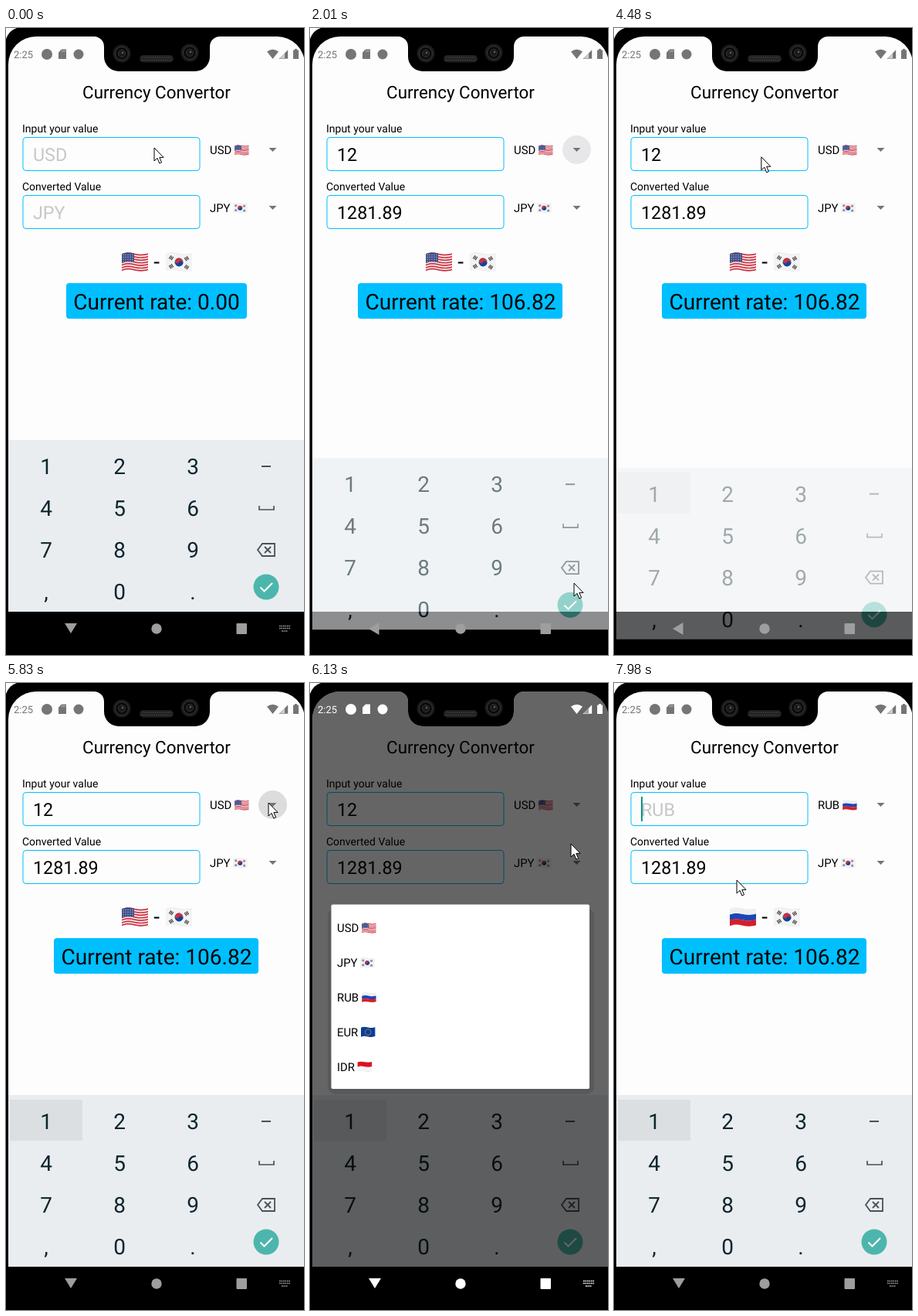
Animation of 386x811 px, one loop 8000 ms. Source, as an HTML page:

```html
<!DOCTYPE html>
<html lang="en">
<head>
<meta charset="utf-8">
<title>Currency Convertor</title>
<style>
  html, body { margin: 0; width: 100%; height: 100%; overflow: hidden; background: #fff; }
  svg { display: block; width: 386px; height: 811px; font-family: Roboto, sans-serif; text-rendering: geometricPrecision; }
  .label { font-size: 14px; }
  .pick { font-size: 14.9px; }
  .field { font-size: 23.3px; }
  .box { fill: none; stroke: #00bfff; }
  .mid { text-anchor: middle; }
  #digits { font-size: 28px; fill: #0c252d; }
</style>
</head>
<body>
<svg viewBox="0 0 386 811">
  <defs>
    <clipPath id="screen">
      <path d="M3 755V47A36 36 0 0 1 39 11H114A13 13 0 0 1 127 24V37A19 19 0 0 0 146 56H245A19 19 0 0 0 264 37V24A13 13 0 0 1 277 11H351A36 36 0 0 1 387 47V755Z"/>
    </clipPath>
    <clipPath id="row"><rect x="27" y="383" width="335" height="45"/></clipPath>
    <g id="arrow"><path d="M-5 -2.5H5L0 2.5Z" fill="#757575"/></g>
    <g id="camera">
      <circle r="11.5" fill="#1b1b1b"/>
      <circle r="8.5" fill="#0b0b0b" stroke="#393939"/>
      <circle r="4.5" fill="#191919" stroke="#333"/>
      <circle cx="1" cy="-1" r="1.2" fill="#666"/>
    </g>
    <g id="flags"></g>
  </defs>

  <path d="M0 811V14Q4 3 14 0H386V811Z"/>
  <g clip-path="url(#screen)">
    <rect width="386" height="755" fill="#fdfdfd"/>
    <text class="mid" x="195" y="91" font-size="22.4">Currency Convertor</text>
    <text class="label" x="21" y="135">Input your value</text>
    <text class="label" x="21" y="209.5">Converted Value</text>
    <rect class="box" x="22" y="141.5" width="229" height="43" rx="4"/>
    <rect class="box" x="22" y="216.5" width="229" height="43" rx="4"/>
    <text class="field" id="amount" x="35" y="172"/>
    <text class="field" id="result" x="35" y="247"/>
    <rect id="caret" y="147" width="2" height="32" fill="#009688"/>
    <circle id="halo" cx="345.5" cy="157.5" r="18.5"/>
    <use href="#arrow" x="345.5" y="157.5"/>
    <use href="#arrow" x="345.5" y="232.5"/>
    <g id="from"></g>
    <g id="to"></g>
    <use id="bigFrom" transform="translate(150 290.3)"/>
    <use href="#JPY" transform="translate(207 290.3)"/>
    <text class="mid" x="195" y="312" font-size="28">-</text>
    <rect id="rateBox" y="330" height="46" rx="4" fill="#00bfff"/>
    <text class="mid" id="rate" x="195" y="364" font-size="28"/>
  </g>

  <use href="#camera" x="150" y="33"/>
  <use href="#camera" x="238" y="32"/>
  <rect x="173" y="35" width="44" height="9.5" rx="4.7" fill="#202020"/>
  <path d="M176 38H214M175 41.5H215" stroke="#464646" stroke-width="1.4" stroke-dasharray="1.4 1.4"/>

  <g id="keyboard">
    <rect x="3" y="533" width="383" height="222" fill="#e9edf0"/>
    <rect id="keyFocus" x="5" y="539" width="94" height="53" fill="#dcdfe1"/>
    <g id="digits" class="mid"></g>
    <g fill="none" stroke="#465359" stroke-width="2">
      <path d="M331 567H343"/>
      <path d="M328 618V623H347V618" stroke-width="1.7"/>
      <path d="M332 667H348V683H332L326 675Z" stroke-width="1.8"/>
      <path d="M335 671L343 679M343 671L335 679" stroke-width="1.8"/>
    </g>
    <circle cx="337" cy="723" r="16.5" fill="#4db6ac"/>
    <path d="M329.5 723.5L334.5 728.5L345 718" fill="none" stroke="#fff" stroke-width="2"/>
  </g>

  <rect id="dim" x="3" y="11" width="383" height="744" clip-path="url(#screen)"/>
  <g id="dialog">
    <rect x="23" y="291" width="345" height="241" rx="10" fill-opacity=".12"/>
    <rect x="27.5" y="286.5" width="334.5" height="238.5" rx="2" fill="#fff"/>
    <circle id="ripple" cx="195" cy="405.5" fill="#f0f0f0" clip-path="url(#row)"/>
    <g id="options"></g>
  </g>

  <g id="status">
    <text x="10" y="38.7" font-size="13">2:25</text>
    <circle cx="53" cy="34" r="7"/>
    <path d="M72 27.5H78V40H68V31.5Z"/>
    <circle cx="94" cy="34" r="6.5"/>
    <path d="M338 30.5Q345.5 25 353 30.5L345.5 40Z"/>
    <path d="M365.5 28V40H353.5Z" fill-opacity=".35"/>
    <path d="M361 32.5V40H353.5ZM365 28.5V39.5H354.5Z" fill-rule="evenodd"/>
    <path d="M372 28.5H374V27H377V28.5H379V40H372Z"/>
  </g>
  <path d="M72.5 31V28.8M74.5 31V28.8M76.3 31V28.8" stroke="#fff" stroke-opacity=".6" stroke-width=".8"/>

  <g id="nav">
    <path id="back"/>
    <circle cx="195" cy="777" r="6.7"/>
    <rect x="298.5" y="770" width="13.5" height="14" rx="1"/>
    <path id="imeIcon" d="M354 773.5H368M354 776.5H368M357 780H365" fill="none" stroke-width="1.7" stroke-dasharray="1.7 .8"/>
  </g>
  <path id="pointer" d="M0 0V17L4 13.3L6.8 20L9.6 18.8L6.8 12.4H12Z" fill="#fff" stroke="#000" stroke-linejoin="round"/>
</svg>

<script>
const LOOP = 8000;
const $ = id => document.getElementById(id);
const set = (id, attrs) => {
  for (const key in attrs) $(id).setAttribute(key, attrs[key]);
};
const ramp = (t, a, b) => Math.min(1, Math.max(0, (t - a) / (b - a)));
const gray = v => `rgb(${v},${v},${v})`;

// A waving horizontal band, 34 units wide.
const band = (y, h, fill) =>
  `<path fill="${fill}" d="M0 ${y + 2}C6 ${y - .7} 11 ${y + .3} 17 ${y + 1.5}S28 ${y + 3} 34 ${y + 1}` +
  `v${h}c-6 2 -11 1.7 -17 .5s-11 -2.2 -17 .5z"/>`;
const repeat = (n, draw) => Array.from({ length: n }, (_, i) => draw(i)).join('');
const dot = (x, y, r, fill) => `<circle cx="${x}" cy="${y}" r="${r}" fill="${fill}"/>`;

const stars = repeat(20, i => dot(2 + i % 5 * 3, 3 + (i / 5 | 0) * 2.9, .6, '#fff'));
const euRing = repeat(12, i => {
  const a = i * Math.PI / 6;
  return dot(17 + 7 * Math.sin(a), 12.7 - 7 * Math.cos(a), 1, '#fc0');
});
const trigrams = [[7, 7, -56], [27, 8, 56], [7, 18, 56], [27, 19, -56]].map(([x, y, a]) =>
  `<path transform="translate(${x} ${y}) rotate(${a})" d="M-2.4 -1.8H2.4M-2.4 0H2.4M-2.4 1.8H2.4" stroke="#222" stroke-width="1"/>`
).join('');
const taegeuk =
  '<g transform="translate(17 12.7) rotate(28)">' + dot(0, 0, 5.4, '#0047a0') +
  '<path d="M-5.4 0A5.4 5.4 0 0 1 5.4 0A2.7 2.7 0 0 1 0 0A2.7 2.7 0 0 0 -5.4 0Z" fill="#d22f3f"/>' +
  dot(-2.7, 0, 2.7, '#d22f3f') + dot(2.7, 0, 2.7, '#0047a0') + '</g>';
const canton = '<path d="M0 2C6 -.7 11 .3 16 1.3V13C11 12 6 11.1 0 13.8Z" fill="#3c4a86"/>';

// dx is the flag's offset from the start of its currency code.
const money = {
  USD: { dx: 32.2, art: band(0, 22, '#f4f0f0') + repeat(7, i => band(i * 3.38, 1.7, '#cf3344')) + canton + stars },
  JPY: { dx: 30, art: band(0, 22, '#e0e0e0') + band(.4, 21.2, '#f3f3f3') + taegeuk + trigrams },
  RUB: { dx: 32.2, art: band(0, 7.5, '#eee') + band(7.3, 7.5, '#1a47b8') + band(14.6, 7.4, '#d51f28') },
  EUR: { dx: 31, art: band(0, 22, '#0b3d99') + euRing },
  IDR: { dx: 26.7, art: band(0, 22, '#ddd') + band(.4, 21.2, '#f5f5f5') + band(0, 11, '#df1020') }
};
const codes = Object.keys(money);
$('flags').innerHTML = codes.map(c => `<g id="${c}">${money[c].art}</g>`).join('');

const option = (code, x, y) =>
  `<text class="pick" x="${x}" y="${y}">${code}</text>` +
  `<use href="#${code}" transform="translate(${x + money[code].dx} ${y - 12}) scale(.54)"/>`;
$('options').innerHTML = codes.map((c, i) => option(c, 35, 322.3 + i * 44.8)).join('');
$('to').innerHTML = option('JPY', 264, 238);
$('digits').innerHTML = ['123', '456', '789', ',0.'].map((row, r) =>
  [...row].map((ch, c) => `<text x="${52 + c * 95}" y="${577 + r * 54}">${ch}</text>`).join('')
).join('');

// Bursts of screen updates: first, last, count.
const bursts = [
  [120, 1080, 8], [1200, 2010, 7], [2130, 2130, 1], [2530, 2950, 4], [3350, 3750, 4],
  [4050, 4960, 8], [5400, 5830, 4], [5980, 6130, 2], [6280, 6400, 2],
  [6520, 6910, 4], [7040, 7430, 3], [7580, 7580, 1], [7980, 7980, 1]
];
const ticks = [0];
for (const [a, b, n] of bursts)
  for (let i = 0; i < n; i++) ticks.push(n > 1 ? a + (b - a) * i / (n - 1) : a);
const snap = t => ticks.filter(k => k <= t + .01).pop();

// Pointer stops: time, x, y.
const stops = [
  [0, 192, 155], [400, 194, 160], [1080, 346, 715], [1470, 342, 718], [2390, 342, 718],
  [2670, 356, 520], [2950, 350, 241], [3210, 350, 241], [3750, 189, 168], [4960, 192, 166],
  [5260, 192, 166], [5680, 340, 155], [5830, 340, 155], [5980, 340, 160], [6130, 338, 208],
  [6400, 250, 340], [6650, 130, 402], [6910, 130, 402], [7430, 151, 281], [7580, 159, 255]
];
function pointerAt(t) {
  const i = stops.findIndex(s => s[0] > t);
  if (i < 0) return stops[stops.length - 1].slice(1);
  const [a, x, y] = stops[i - 1], [b, x2, y2] = stops[i];
  const p = ramp(t, a, b), e = p * p * (3 - 2 * p);
  return [x + (x2 - x) * e, y + (y2 - y) * e];
}

function draw(time) {
  const t = snap(time);
  const code = t < 7040 ? 'USD' : 'RUB';
  const typed = t < 250 || t >= 7040 ? '' : t < 390 ? '1' : '12';
  const done = t >= 1870;

  set('amount', { fill: typed ? '#000' : '#c7c7c7' });
  $('amount').textContent = typed || code;
  set('result', { fill: done ? '#000' : '#c7c7c7' });
  $('result').textContent = done ? '1281.89' : 'JPY';
  $('from').innerHTML = option(code, 264, 163.3);
  set('bigFrom', { href: '#' + code });
  $('rate').textContent = 'Current rate: ' + (done ? '106.82' : '0.00');
  set('rateBox', done ? { x: 62, width: 265 } : { x: 78, width: 234 });

  const caretOn = t >= 7980 || (t >= 250 && t < 800);
  set('caret', { x: 35 + typed.length * 13.1, opacity: caretOn ? 1 : 0 });

  const pressed = t >= 5830 && t < 5980;
  const focused = done && t < 4300;
  set('halo', { fill: pressed ? '#dcdcdc' : '#e7e7e9', opacity: pressed || focused ? 1 : 0 });

  const shown = t < 3000 ? 1 - ramp(t, 1930, 2130) : ramp(t, 4340, 4600);
  set('keyboard', { opacity: shown, transform: `translate(0 ${(1 - shown) * 58})` });
  set('keyFocus', { opacity: t > 4300 ? 1 : 0 });
  const imeOpen = shown > .9;
  set('back', { d: imeOpen ? 'M76 770H92L84 783Z' : 'M89.5 769V785L76 777Z' });
  set('imeIcon', { opacity: imeOpen ? 1 : 0 });

  const opening = ramp(t, 5900, 6100);
  const closing = 1 - ramp(t, 6867, 7058);
  const dialog = opening * closing;
  set('dim', { opacity: .6 * opening * Math.sqrt(closing) });
  set('dialog', { opacity: dialog });
  set('ripple', { r: 104 * ramp(t, 6620, 6910) });
  set('status', { fill: dialog > 0 ? '#fff' : '#757575' });
  const navColor = gray(Math.round(158 + 97 * dialog));
  set('nav', { fill: navColor });
  set('imeIcon', { stroke: navColor });

  const [x, y] = pointerAt(t);
  set('pointer', { transform: `translate(${x} ${y})` });
}

const start = performance.now();
function frame() {
  draw((performance.now() - start) % LOOP);
  requestAnimationFrame(frame);
}
frame();
</script>
</body>
</html>
```
